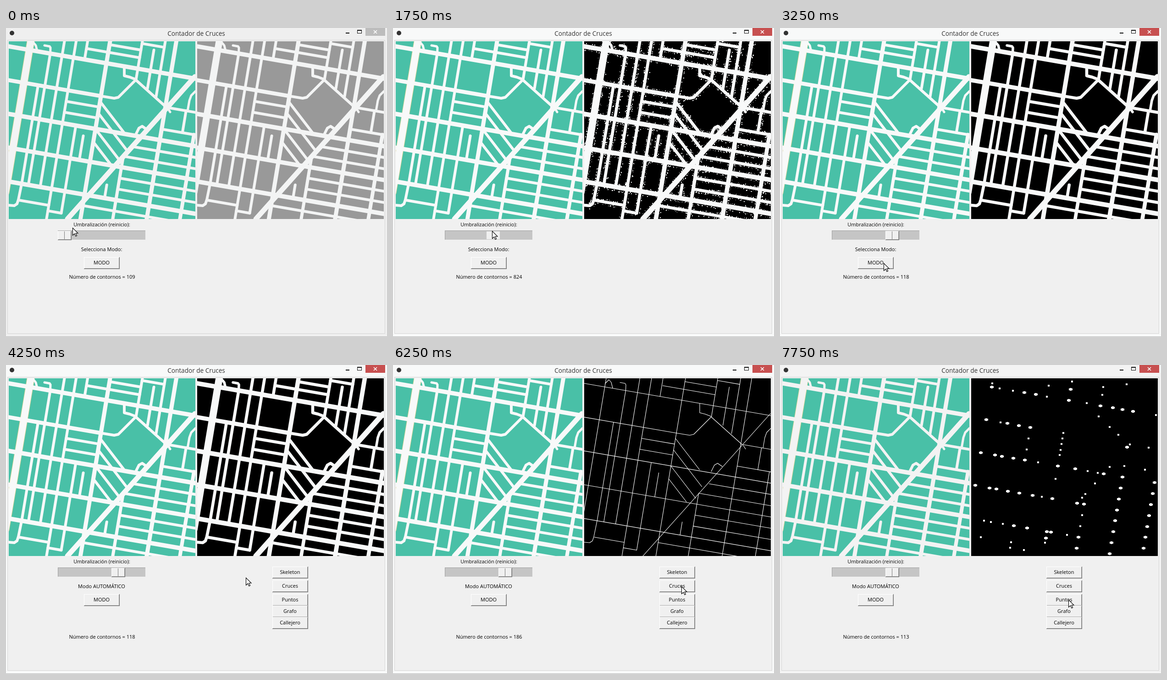
Recreate the animation shown at these times as an HTML page with a canvas. Size 831 by 673 pixels, loop 8000 ms.

```html
<!DOCTYPE html>
<html lang="es">
<head>
<meta charset="utf-8">
<title>Contador de Cruces</title>
<style>
html, body { margin: 0; width: 100%; height: 100%; overflow: hidden; background: #f0f0f0; }
canvas { display: block; }
</style>
</head>
<body>
<canvas id="stage" width="831" height="673"></canvas>
<script>
const g = document.getElementById('stage').getContext('2d');
const STEP = 250, LOOP = 8000;
const FONT = '"Open Sans", "Noto Sans", sans-serif';

// The city is a tilted grid. A column is named by its x at the map's top edge,
// a row by its number; three rows make one block between avenues.
const ROW = 24.53, ROW_SLOPE = .1725, COL_SLOPE = .167, TOP = 29;
const WEST = 0, C1 = 54, C2 = 227, C3 = 297.5, C4 = 371.5, C5 = 444, EAST = 520;
const streets = [];

function corner(col, row) {
  const y = (40 + ROW * row + ROW_SLOPE * (col + COL_SLOPE * TOP - 6)) / (1 + ROW_SLOPE * COL_SLOPE);
  return [col - COL_SLOPE * (y - TOP), y];
}
const path = (w, ...p) => streets.push({ w, p });
const across = (row, from, to, w = 6) => path(w, corner(from, row), corner(to, row));
const down = (col, from, to, w = 6) => path(w, corner(col, from), corner(col, to));

function buildCity() {
  // avenues
  down(C1, -2, 13, 15);
  path(11, [412, 106], [134, 416]);
  for (const row of [0, 6, 9, 12]) across(row, WEST, EAST, 9.5);
  across(3, WEST, C2, 8.5);
  across(3, C4, EAST);
  down(C2, -4, 16, 9);
  down(C4, -4, 18, 9);
  down(C5, 5, 18, 8);
  down(C3, 8, 16, 7);
  // west side
  down(86, 3, 12);
  down(101, 0, 12);
  down(127.5, -4, 12);
  down(153, -4, 16);
  down(183, 6, 14);
  down(203, 6.8, 9);
  across(4, 153, C2);
  across(5, 153, C2);
  across(13.5, 86, 153);
  across(14, 153, 183);
  // north side
  down(178, -4, 0);
  down(C3, -4, 1);
  down(325.7, -1.9, 1.6);
  down(347.5, -4, 2.2);
  across(-1, 180, C3);
  across(-1.7, C2, C3);
  across(-2.3, C3, 347.5);
  // east and south
  across(5, C4, EAST);
  across(7, 317, EAST);
  for (const row of [8, 10, 11]) across(row, C3, EAST);
  across(13, C2, EAST);
  down(418, 3, 5);
  down(272, 10.8, 12);
  // slanted lanes leaving the second avenue
  for (const [y, drop] of [[160, 68], [185, 80], [220, 70], [248, 50]]) {
    const x = C2 - COL_SLOPE * (y - TOP);
    path(6, [x, y], [x + .77 * drop, y + drop]);
  }
  // park edge, hooks and bends
  path(6, corner(C2, 3), [236, 153], [245, 151], [283, 113], [349, 172]);
  path(6, [258, 84], [258, 104], [270, 107], [283, 112]);
  path(5, [84, 38], [95, 40], [97, 43], corner(101, 0));
  path(5, [52, 40], [60, 32], [65, 38], [68, 50]);
  path(6, corner(86, 12), [27, 374], [24, 383], [18, 387], [6, 386]);
  path(6, [283, 232], [290, 218], [297, 214], [307, 221]);
  path(5, [396, 181], [400, 158], [404, 147], [413, 138]);
  path(5, [353, 175], [358, 183]);
}
buildCity();

const segments = streets.flatMap(s => s.p.slice(1).map(([x2, y2], i) => {
  const [x, y] = s.p[i];
  return { s, x, y, dx: x2 - x, dy: y2 - y, len: Math.hypot(x2 - x, y2 - y) };
}));

function findJunctions() {
  const found = [], kept = [];
  const nearEnd = ({ p }, x, y) => [p[0], p.at(-1)].some(e => Math.hypot(x - e[0], y - e[1]) < 9);
  const inside = (k, len) => k * len > -5 && k * len < len + 5;
  segments.forEach((a, i) => segments.slice(i + 1).forEach(b => {
    const cross = a.dx * b.dy - a.dy * b.dx;
    if (a.s === b.s || Math.abs(cross) < .2 * a.len * b.len) return;
    const ex = b.x - a.x, ey = b.y - a.y;
    const t = (ex * b.dy - ey * b.dx) / cross, u = (ex * a.dy - ey * a.dx) / cross;
    if (!inside(t, a.len) || !inside(u, b.len)) return;
    const x = a.x + t * a.dx, y = a.y + t * a.dy;
    if (x < 10 || x > 409 || y < 34 || y > 412) return;
    found.push({ x, y, big: !nearEnd(a.s, x, y) && !nearEnd(b.s, x, y) });
  }));
  found.sort((a, b) => b.big - a.big).forEach(j => {
    if (kept.every(k => Math.hypot(k.x - j.x, k.y - j.y) > 8)) kept.push(j);
  });
  return kept;
}
const junctions = findJunctions();

function rect(x, y, w, h, color) {
  g.fillStyle = color;
  g.fillRect(x, y, w, h);
}

function text(s, x, y, size = 11, color = '#000') {
  g.font = `${size}px ${FONT}`;
  g.textAlign = 'center';
  g.fillStyle = color;
  g.fillText(s, x, y);
}

function line(points, width, color) {
  g.beginPath();
  points.forEach(p => g.lineTo(...p));
  g.lineWidth = width;
  g.strokeStyle = color;
  g.stroke();
}

function speckle(density, color) {
  let seed = 7;
  const rnd = () => (seed = seed * 16807 % 2147483647) / 2147483647;
  for (const { s, x, y, dx, dy, len } of segments) {
    for (let n = len * density; n > 0; n--) {
      const t = rnd(), off = (s.w / 2 + rnd() * 4) * (rnd() < .5 ? -1 : 1);
      const size = rnd() < .4 ? 2 : 1;
      rect(Math.round(x + t * dx - off * dy / len), Math.round(y + t * dy + off * dx / len), size, size, color);
    }
  }
}

function panel(left, ground, draw) {
  g.save();
  g.translate(left - 6, 0);
  g.beginPath();
  g.rect(6, TOP, 407, 387);
  g.clip();
  g.lineCap = g.lineJoin = 'round';
  rect(6, TOP, 407, 387, ground);
  draw();
  g.restore();
}

const drawStreets = (color, extra = 0) => streets.forEach(s => line(s.p, s.w + extra, color));

function drawJunction({ x, y, big }) {
  x = Math.round(x);
  y = Math.round(y);
  if (big) {
    rect(x - 4, y - 2, 8, 4, '#fff');
    rect(x - 2, y - 3, 4, 6, '#fff');
  } else rect(x - 2, y - 2, 4, 4, '#fff');
}

function drawResult(step, light, noise) {
  const dark = draw => panel(417, '#000', draw);
  if (step < 2) panel(417, '#999', () => drawStreets(light));
  else if (step < 7) panel(417, light, () => {});
  else if (step < 22) dark(() => {
    drawStreets(light, .6);
    speckle(noise * .25, light);
  });
  else if (step < 28) dark(() => streets.forEach(s => line(s.p, 1.1, '#fff')));
  else dark(() => junctions.forEach(drawJunction));
}

function bevel(x, y, w, h, sunken) {
  rect(x, y, w, h, sunken ? '#fff' : '#707070');
  rect(x, y, w - 1, h - 1, sunken ? '#707070' : '#fff');
  rect(x + 1, y + 1, w - 2, h - 2, sunken ? '#f0f0f0' : '#a5a5a5');
  rect(x + 1, y + 1, w - 3, h - 3, '#f0f0f0');
}

function button(label, x, y, pressed) {
  bevel(x, y, 78, 26, pressed);
  text(label, x + 38.5 + !!pressed, y + 16 + !!pressed);
}

function slider(x, pressed) {
  rect(113, 441, 191, 20, '#a0a0a0');
  rect(114, 442, 190, 19, '#c5c5c5');
  if (pressed) rect(x, 443, 29, 17, '#f0f0f0');
  else bevel(x, 442, 30, 20);
  rect(x + 14, 443, 1, 17, pressed ? '#bbb' : '#777');
}

function cursor(x, y) {
  g.save();
  g.translate(x + .5, y + .5);
  g.beginPath();
  [[0, 0], [0, 16], [4, 12.5], [6.5, 18], [9, 17], [6.5, 11.5], [11.5, 11.5]].forEach(p => g.lineTo(...p));
  g.closePath();
  g.fillStyle = '#fff';
  g.fill();
  g.lineWidth = 1.1;
  g.strokeStyle = '#000';
  g.stroke();
  g.restore();
}

function windowFrame(light, active) {
  rect(0, 0, 831, 673, light);
  rect(3, 26, 824, 640, '#d4d4d4');
  rect(4, 27, 822, 638, '#f0f0f0');
  rect(0, 672, 831, 1, '#b0b0b0');
  g.fillStyle = '#333';
  g.beginPath();
  g.arc(13, 11, 5, 0, 7);
  g.fill();
  text('Contador de Cruces', 415, 17, 13.6, '#333');
  rect(741, 10, 8, 2, '#111');
  rect(766, 4, 10, 8, '#111');
  rect(767, 6, 8, 5, light);
  rect(784, 0, 43, 17, active ? '#c75050' : '#bcbcbc');
  line([[802, 5], [809, 12]], 1.6, '#fff');
  line([[809, 5], [802, 12]], 1.6, '#fff');
}

// Where the pointer rests or turns: step, x, y
const stops = [[0, 145, 435], [2, 132, 450], [5, 132, 450], [8, 226, 441], [10, 241, 450],
  [13, 226, 512], [15, 226, 512], [19, 622, 447], [23, 622, 447],
  [25, 629, 482], [29, 629, 482], [31, 629, 511]];

function pointer(step) {
  const i = stops.findLastIndex(s => s[0] <= step);
  const [t0, x0, y0] = stops[i], [t1, x1, y1] = stops[i + 1] || [LOOP, x0, y0];
  const k = 1 - (1 - (step - t0) / (t1 - t0)) ** 2;
  return [Math.round(x0 + (x1 - x0) * k), Math.round(y0 + (y1 - y0) * k)];
}

function contours(step, noise) {
  if (step < 2) return 109;
  if (step < 7) return 0;
  if (step < 22) return 118 + Math.round(353 * noise);
  return step < 28 ? 186 : 113;
}

function draw(step) {
  const light = step < 1 ? '#efefef' : step < 30 ? '#f8f9f9' : '#f3f3f3';
  const streetLight = step ? light : '#f3f4f4';
  const noise = step < 10 ? 2 ** (8 - step) : 0;
  const auto = step >= 14, dragging = step >= 2 && step < 10;
  const [x, y] = pointer(step);
  const count = contours(step, noise);

  windowFrame(light, step > 0);
  panel(6, '#49c0a7', () => {
    line(streets[0].p, 17, '#d9d596');
    drawStreets(streetLight);
  });
  drawResult(step, streetLight, noise);

  text('Umbralización (reinicio):', 209, 432);
  slider(step < 2 ? 113 : step < 10 ? Math.max(113, x - 12) : 230, dragging);
  text(auto ? 'Modo AUTOMÁTICO' : 'Selecciona Modo:', 208.5, 486);
  button('MODO', 170, 499);
  text('Número de contornos = ' + count, 209.5, auto ? 596 : 546);
  if (count === 0) for (const edge of [138, 279]) rect(edge, 538, 1, 8, '#333');
  if (auto) {
    button('Skeleton', 581, 439, step === 21);
    button('Cruces', 581, 469, step === 27);
    ['Puntos', 'Grafo', 'Callejero'].forEach((label, i) => button(label, 581, 499 + 25 * i));
  }
  cursor(x, y);
}

let shown = -1;
function tick() {
  const step = Math.floor(performance.now() % LOOP / STEP);
  if (step !== shown) draw(shown = step);
  requestAnimationFrame(tick);
}
tick();
</script>
</body>
</html>
```
